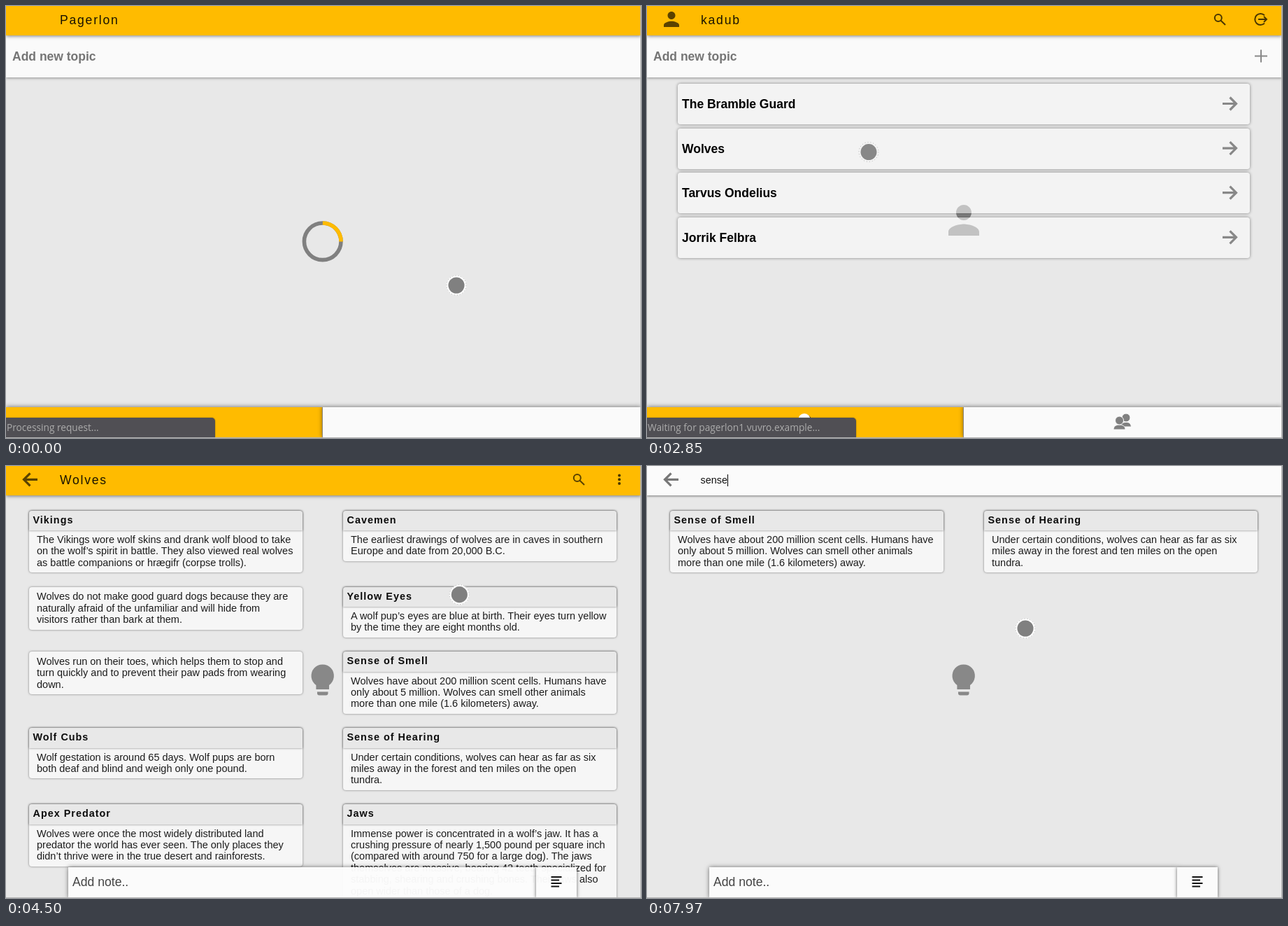
An HTML page that plays this animation: 908 by 617 pixels, repeating every 8 s.

```html
<!DOCTYPE html>
<html lang="en">
<head>
<meta charset="utf-8">
<title>Notes</title>
<style>
* { box-sizing: border-box; }
html, body { margin: 0; width: 100%; height: 100%; overflow: hidden; }
body { position: relative; background: #e8e8e8; font-family: "Liberation Sans", Arial, sans-serif; }
div, svg { position: absolute; }
.full, svg { left: 0; top: 0; width: 908px; height: 617px; overflow: hidden; }
[hidden] { display: none !important; }
.bar { left: 0; top: 0; width: 908px; height: 42px; background: #fb0; box-shadow: 0 1px 5px rgba(0,0,0,.5); }
.title { left: 77px; top: 0; font-size: 17.6px; line-height: 40px; letter-spacing: .1em; color: #1a1300; white-space: nowrap; }
.topic { left: 0; top: 42px; width: 908px; height: 60px; padding-left: 9px; background: #fafafa; font: bold 17.5px/60px "Liberation Sans", Arial, sans-serif; color: #757575; box-shadow: 0 1px 4px rgba(0,0,0,.4); }
.row { left: 44px; width: 818px; height: 58px; padding-left: 6px; border-radius: 4px; background: rgba(255,255,255,.5); font: bold 17.5px/58px "Liberation Sans", Arial, sans-serif; color: #000; box-shadow: 0 0 4px rgba(0,0,0,.45); }
.tab { top: 573px; height: 44px; box-shadow: 0 -1px 6px rgba(0,0,0,.45); }
#status { left: 0; top: 588px; width: 299px; height: 28px; padding-left: 1px; border-radius: 0 5px 0 0; background: #504f54; color: #acacac; font: 13.7px/28px "Open Sans", "Noto Sans", sans-serif; white-space: nowrap; box-shadow: 0 0 2px rgba(0,0,0,.4); }
#grid { left: 33px; top: 63.5px; display: grid; grid-template-columns: 391px 391px; column-gap: 58px; row-gap: 20.3px; align-items: start; }
#grid div { position: relative; }
#grid .card { background: #f6f6f6; border-radius: 4px; box-shadow: 0 0 3px rgba(0,0,0,.5); }
#grid .head { height: 28.5px; padding-left: 5.5px; border-radius: 4px 4px 0 0; background: #e8e8e8; font: bold 14.4px/27px "Liberation Sans", Arial, sans-serif; letter-spacing: 1px; color: #0c0c0c; box-shadow: 0 0 3px rgba(0,0,0,.5); }
#grid .body { padding: 5.8px 11px 6px; font-size: 14.5px; line-height: 16.4px; color: #1c1c1c; white-space: pre; }
#grid .head + .body { padding-top: 5px; }
.note { left: 89px; top: 573px; width: 669px; height: 44px; padding-left: 6px; background: rgba(252,252,252,.97); color: #444; font-size: 17.6px; line-height: 43px; box-shadow: 0 0 6px rgba(0,0,0,.55); }
.send { left: 758px; top: 573px; width: 58px; height: 44px; background: rgba(252,252,252,.97); box-shadow: 0 0 5px rgba(0,0,0,.6); }
#search { left: 0; top: 0; width: 908px; height: 42px; background: #fbfbfb; box-shadow: 0 1px 3px rgba(0,0,0,.5); }
#query { left: 76.5px; top: 0; font-size: 14.4px; line-height: 40px; white-space: nowrap; }
#caret { top: 12px; width: 1px; height: 17px; background: #000; }
.edge { border: solid #b4b4b4; border-width: 0 1px 1px 0; }
.line { fill: none; stroke: currentColor; }
</style>
</head>
<body>
<svg width="0" height="0">
  <defs>
    <path id="person" d="M12 12c2.21 0 4-1.79 4-4s-1.79-4-4-4-4 1.79-4 4 1.79 4 4 4zm0 2c-2.67 0-8 1.34-8 4v2h16v-2c0-2.66-5.33-4-8-4z"/>
    <path id="globe" d="M-9.3 19.3V13.2A16.2 16.2 0 1 1 9.3 13.2V19.3Z"/>
    <path id="arrow" class="line" stroke-width="3.2" d="M-10 0H9M0.5-9L9.5 0L0.5 9"/>
    <g id="lens" class="line" stroke-width="2"><circle cx="816.8" cy="17" r="5"/><path d="M820.5 20.7L827 27"/></g>
  </defs>
</svg>

<div id="list" class="full">
  <svg id="mark" fill="#868686"><use href="#person" transform="translate(420 273) scale(2.75)"/></svg>
  <div id="rows"></div>
  <div class="topic">Add new topic</div>
  <div class="bar"></div>
  <div class="title" id="owner"></div>
  <div class="tab" style="left:0;width:452px;background:#fb0"></div>
  <div class="tab" style="left:452px;width:456px;background:#fafafa;border-left:1px solid #888"></div>
  <svg id="icons">
    <use href="#person" transform="translate(18.5 2.5) scale(1.375)" fill="#5a4200"/>
    <g color="#4a3600">
      <use href="#lens"/>
      <path class="line" stroke-width="2" d="M883 13.4A8 8 0 1 0 883 24.6M874 19H886M882 15L886 19L882 23"/>
    </g>
    <path stroke="#888" stroke-width="2" d="M869 71.5H887M878 62.5V80.5"/>
    <use href="#globe" transform="translate(226.2 591.5) scale(.53)" fill="#111"/>
    <use href="#globe" transform="translate(225 590.5) scale(.53)" fill="#fff"/>
    <path stroke="#111" stroke-width="2" d="M221 601.5H231M222 605H230"/>
    <g fill="#808080" stroke="#fafafa">
      <path d="M676 601c1-5 4-6 8-6.500s8 1 8.500 6.500z"/><circle cx="685" cy="588" r="6"/>
      <path d="M667 605c0-5 4-7 8.500-7s8.500 2 8.500 7z"/><circle cx="675.500" cy="592" r="6"/>
    </g>
  </svg>
  <svg id="spinner" class="line" stroke-width="5.6" fill="none">
    <circle cx="452.7" cy="336.3" r="26.3" stroke="#808080"/>
    <path id="arc" d="M452.7 310A26.3 26.3 0 0 1 479 336.3" stroke="#fb0"/>
  </svg>
</div>

<div id="notes" class="full">
  <svg fill="#888">
    <use href="#globe" x="452.7" y="299.7"/>
    <path d="M445 322.5H460.500V324.500Q460.500 327.500 457.500 327.500H448Q445 327.500 445 324.500Z"/>
  </svg>
  <div id="grid"></div>
  <div class="note">Add note..</div>
  <div class="send"></div>
  <svg><path stroke="#111" stroke-width="2" d="M779.500 587H794.500M779.500 591.500H791M779.500 596H794.500M779.500 600.500H791"/></svg>
  <div id="head" class="full">
    <div class="bar"></div>
    <div class="title">Wolves</div>
    <svg color="#5a4200">
      <use href="#arrow" transform="translate(35 19.3) scale(-1 1)"/>
      <use href="#lens"/>
      <g fill="#4a3600"><circle cx="877" cy="13.5" r="2"/><circle cx="877" cy="19.3" r="2"/><circle cx="877" cy="25" r="2"/></g>
    </svg>
  </div>
  <div id="search">
    <svg color="#777"><use href="#arrow" transform="translate(35 19.3) scale(-1 1)"/></svg>
    <div id="query"></div>
    <div id="caret"></div>
  </div>
</div>

<div id="status"></div>
<svg>
  <g id="cursor">
    <g id="halo" fill="none" stroke="#fff">
      <circle r="12.7" stroke-width="2.2"/>
      <circle r="14" stroke-width="1.2" stroke-dasharray="1.5 1.5"/>
    </g>
    <circle r="14" fill="none" stroke="#999" stroke-width=".8" stroke-dasharray="1 3"/>
    <circle r="11.5" fill="#808080"/>
  </g>
</svg>
<div class="full edge"></div>

<script>
const LOOP = 8000;
const $ = id => document.getElementById(id);
const show = (id, on) => { $(id).hidden = !on; $(id).style.display = on ? "" : "none"; };

const topics = ["The Bramble Guard", "Wolves", "Tarvus Ondelius", "Jorrik Felbra"];
$("rows").innerHTML = topics.map((name, i) => `<div class="row" style="top:${111 + i * 63.6}px">${name}</div>`).join("") +
  `<svg color="#888">${topics.map((_, i) => `<use href="#arrow" x="833" y="${139.500 + i * 63.6}"/>`).join("")}</svg>`;

const cards = [
  ["Vikings", "The Vikings wore wolf skins and drank wolf blood to take\non the wolf’s spirit in battle. They also viewed real wolves\nas battle companions or hrægifr (corpse trolls)."],
  ["Cavemen", "The earliest drawings of wolves are in caves in southern\nEurope and date from 20,000 B.C."],
  ["", "Wolves do not make good guard dogs because they are\nnaturally afraid of the unfamiliar and will hide from\nvisitors rather than bark at them."],
  ["Yellow Eyes", "A wolf pup’s eyes are blue at birth. Their eyes turn yellow\nby the time they are eight months old."],
  ["", "Wolves run on their toes, which helps them to stop and\nturn quickly and to prevent their paw pads from wearing\ndown."],
  ["Sense of Smell", "Wolves have about 200 million scent cells. Humans have\nonly about 5 million. Wolves can smell other animals\nmore than one mile (1.6 kilometers) away."],
  ["Wolf Cubs", "Wolf gestation is around 65 days. Wolf pups are born\nboth deaf and blind and weigh only one pound."],
  ["Sense of Hearing", "Under certain conditions, wolves can hear as far as six\nmiles away in the forest and ten miles on the open\ntundra."],
  ["Apex Predator", "Wolves were once the most widely distributed land\npredator the world has ever seen. The only places they\ndidn’t thrive were in the true desert and rainforests."],
  ["Jaws", "Immense power is concentrated in a wolf’s jaw. It has a\ncrushing pressure of nearly 1,500 pound per square inch\n(compared with around 750 for a large dog). The jaws\nthemselves are massive, bearing 42 teeth specialized for\nstabbing, shearing and crushing bones. Their jaws also\nopen wider than those of a dog."]
];
$("grid").innerHTML = cards.map(([head, body]) =>
  `<div class="card">${head && `<div class="head">${head}</div>`}<div class="body">${body}</div></div>`).join("");
const cardNodes = [...$("grid").children];

// Pointer path: time, x, y
const path = [
  [0, 644, 399], [540, 644, 399], [690, 635, 398], [840, 631, 398], [1000, 618, 398],
  [1300, 545, 378], [1610, 453, 338], [2070, 308, 155], [2230, 308, 156], [2460, 309, 191],
  [2600, 310, 192], [2670, 317, 208], [3020, 317, 209], [3340, 321, 209], [3420, 321, 208],
  [3810, 321, 133], [3960, 314, 130], [4160, 314, 130], [4350, 480, 192], [4500, 648, 184],
  [4960, 797, 44], [5040, 798, 43], [5270, 810, 27], [7600, 810, 27], [7970, 541, 232]
];
const keyTimes = [6430, 6660, 6740, 6810, 6970];

function pointer(t) {
  const i = path.findIndex(p => p[0] > t);
  if (i < 0) return path[path.length - 1].slice(1);
  const [t0, x0, y0] = path[i - 1], [t1, x1, y1] = path[i];
  const k = (t - t0) / (t1 - t0);
  return [x0 + (x1 - x0) * k, y0 + (y1 - y0) * k];
}

function draw(t) {
  const loaded = t >= 540, inNotes = t >= 3020, searching = t >= 5810;
  show("list", !inNotes);
  show("notes", inNotes);
  for (const id of ["mark", "rows", "icons"]) show(id, loaded);
  show("spinner", !loaded);
  $("arc").setAttribute("transform", `rotate(${t * .36} 452.7 336.3)`);
  $("owner").textContent = loaded ? "kadub" : "Pagerlon";

  show("status", t < 690 || (t >= 2850 && !inNotes));
  $("status").textContent = t < 690 ? "Processing request..." : "Waiting for pagerlon1.vuvro.example...";

  show("head", t < 5740);
  show("search", searching);
  const typed = "sense".slice(0, keyTimes.filter(k => t >= k).length);
  $("query").textContent = typed || "Search notes";
  $("query").style.color = typed ? "#111" : "#757575";
  cardNodes.forEach((node, i) => { node.hidden = !cards[i].join("\n").toLowerCase().includes(typed); });
  show("caret", t >= 5970 && (t < 7430 || t >= 7930));
  $("caret").style.left = 76.5 + (typed ? $("query").offsetWidth : 0) + "px";

  $("cursor").setAttribute("transform", `translate(${pointer(t)})`);
  $("cursor").style.opacity = t >= 2850 && t < 3400 ? .93 : 1;
  show("halo", t < 2850 || t >= 3400);
}

const start = performance.now();
function tick() {
  draw((performance.now() - start) % LOOP);
  requestAnimationFrame(tick);
}
tick();
</script>
</body>
</html>
```
